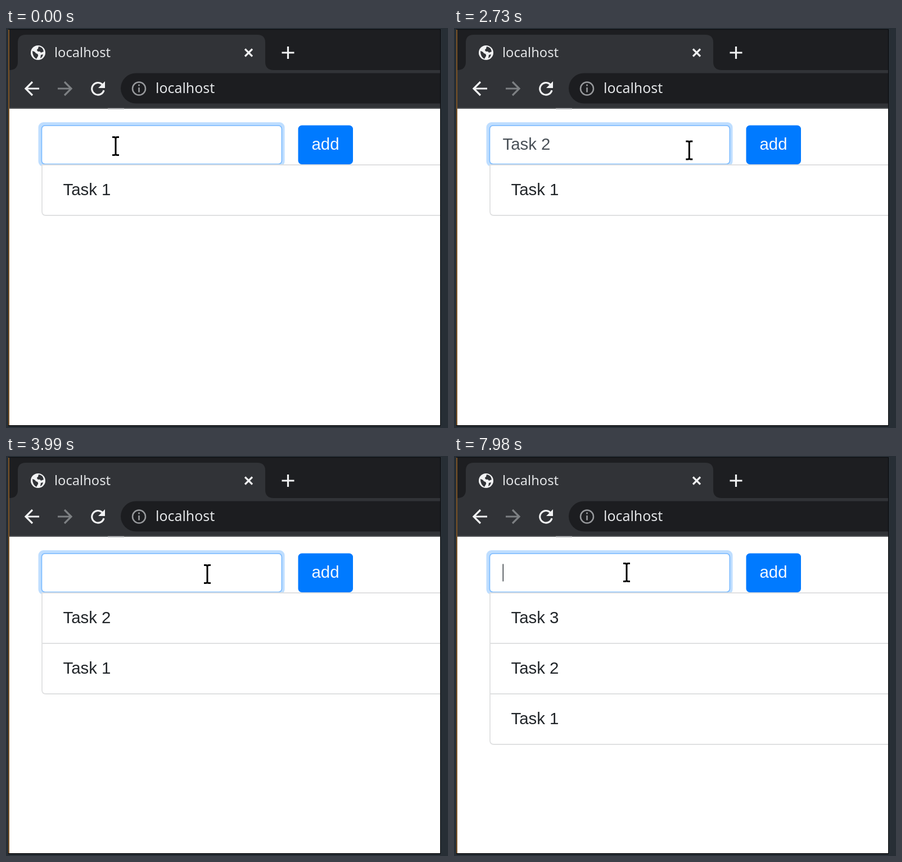
Recreate the animation shown at these times as an HTML page. Size 786 by 713 pixels, loop 8 s.

```html
<!DOCTYPE html>
<html lang="en">
<head>
<meta charset="utf-8">
<title>Task list</title>
<style>
html, body { margin: 0; width: 100%; height: 100%; overflow: hidden; background: #272e35; }
svg { display: block; width: 100%; height: 100%; }
text { font: 29.4px "Liberation Sans", Arial, sans-serif; white-space: pre; }
.ui { font-family: "Noto Sans", "Open Sans", sans-serif; fill: #e2e4e6; }
.icon { fill: none; stroke: #f1f2f3; stroke-width: 3.2; }
.item rect { fill: #fff; }
.item path { fill: none; stroke: #dfe0e1; stroke-width: 1.8; }
.item text { fill: #212529; }
</style>
</head>
<body>
<svg viewBox="0 0 786 713">
  <defs><clipPath id="view"><rect x="6" y="144" width="766" height="564"/></clipPath></defs>

  <!-- browser window -->
  <rect x="4" y="2" width="769" height="707.5" fill="#08090b"/>
  <rect x="6" y="3" width="766" height="73" fill="#1d1e21"/>
  <path d="M6 75Q21 75 21 60V26Q21 12 35 12H447Q461 12 461 26V60Q461 75 476 75H772V143H6Z" fill="#313337"/>
  <path d="M772 80.500H231a27 27 0 0 0 0 54H772Z" fill="#1c1d20"/>
  <rect x="6" y="142" width="766" height="2" fill="#505255"/>
  <rect x="6" y="144" width="766" height="564" fill="#fff"/>
  <rect x="181" y="143" width="29" height="2" fill="#b5b6b8"/>
  <path d="M5 3V708" stroke="#7c5426" stroke-width="2"/>

  <!-- tab and toolbar -->
  <circle cx="57" cy="44" r="13" fill="#f1f2f3"/>
  <path d="M47 41q5 1 6 4q5 1 4 5l-3 5q-7-4-7-14zM58 33q8 1 9 9l-5 2q-1-3-5-2q-4-3 0-5zM62 48l4-1q-1 5-5 7z" fill="#313337"/>
  <text class="ui" x="86" y="52" style="font-size:23.700px">localhost</text>
  <text class="ui" x="266" y="116" style="font-size:24.900px">localhost</text>
  <path class="icon" d="M425 37.500l13 13m0-13l-13 13" stroke-width="3"/>
  <path class="icon" d="M490.500 44h22m-11-11v22"/>
  <path class="icon" d="M59 108H35m12-12l-12 12l12 12"/>
  <path class="icon" d="M92 108h24m-12-12l12 12l-12 12" style="stroke:#7d8083"/>
  <path class="icon" d="M171 100.500A10.800 10.800 0 1 0 174 111"/>
  <path d="M176 95v12h-12z" fill="#f1f2f3"/>
  <circle class="icon" cx="236.500" cy="108" r="11.500" style="stroke:#97999c;stroke-width:2.500"/>
  <path class="icon" d="M236.500 106v8.500m0-14v3" style="stroke:#97999c;stroke-width:2.600"/>

  <!-- page -->
  <g clip-path="url(#view)">
    <rect x="57.500" y="168" width="438" height="79" rx="9" fill="#bfdeff"/>
    <rect x="63.400" y="173.900" width="427" height="68.700" rx="6" fill="#fff" stroke="#80bdff" stroke-width="1.800"/>
    <text id="entry" x="86.500" y="217" fill="#495057"></text>
    <rect id="caret" y="192.500" width="1.600" height="31" fill="#3d4349"/>
    <rect id="button" x="519.500" y="173.500" width="97.500" height="69.500" rx="6.500"/>
    <text x="543.500" y="217" fill="#f4f8ff">add</text>
    <g id="list"></g>
  </g>

  <!-- pointers -->
  <g id="beam" fill="none" stroke-linejoin="round">
    <path id="beamLine" d="M-6-15.500h3.500q2.500 0 2.500 3q0-3 2.500-3h3.500M0-13v26M-6 16.500h3.500q2.500 0 2.500-3q0 3 2.500 3h3.500" stroke="#fff" stroke-width="5.500"/>
    <use href="#beamLine"/>
    <path d="M-6-15.500h3.500q2.500 0 2.500 3q0-3 2.500-3h3.500M0-13v26M-6 16.500h3.500q2.500 0 2.500-3q0 3 2.500 3h3.500" stroke="#050505" stroke-width="3"/>
  </g>
  <path id="hand" d="M-3 1q0-3 3-3t3 3v10q5-2 7 1q4-2 6 1q5-1 5 4v9l-3 4v5H1v-4l-11-11q-2-3 0-5q3-2 7 3z" fill="#050505" stroke="#fff" stroke-width="1.600" stroke-linejoin="round"/>
</svg>
<script>
const $ = id => document.getElementById(id);
const LOOP = 8000, STEP = 70, BLINK = 600;

// [time, entry text, number of tasks]
const edits = [
  [-900, "", 1],
  [840, "T", 1], [980, "Ta", 1], [1120, "Tas", 1], [1260, "Task", 1], [1470, "Task ", 1], [1750, "Task 2", 1],
  [3320, "", 2],
  [4990, "T", 2], [5130, "Ta", 2], [5270, "Tas", 2], [5400, "Task", 2], [5560, "Task ", 2], [5770, "Task 3", 2],
  [6230, "", 3]
];

// [start, end, x, y] of each pointer move
const moves = [
  [0, 1, 195, 210],
  [2380, 2980, 553, 222],
  [3400, 3850, 358, 210],
  [7420, 7840, 307, 207]
];

const clamp = v => Math.max(0, Math.min(1, v));
const ease = v => v * v * (3 - 2 * v);
const mix = (a, b, k) => a + (b - a) * k;

function pointerAt(t) {
  let [, , x, y] = moves[0];
  for (const [start, end, toX, toY] of moves) {
    const k = ease(clamp((t - start) / (end - start)));
    x = mix(x, toX, k);
    y = mix(y, toY, k);
  }
  return [x, y];
}

function listMarkup(count) {
  let out = "";
  for (let i = 0; i < count; i++) {
    const y = 244 + 90 * i;
    const edge = i < count - 1 ? "M64 0V90H790" : "M64 0V83q0 7 7 7H790";
    out += `<g class="item" transform="translate(0 ${y})"><rect x="63" width="723" height="91"/>` +
      `<path d="M64 0H790${edge}"/><text x="101.500" y="54">Task ${count - i}</text></g>`;
  }
  return out;
}

let shown = 0;
function draw(now) {
  const t = Math.floor(now % LOOP / STEP) * STEP;
  const [since, text, count] = edits.findLast(e => e[0] <= t);
  const [x, y] = pointerAt(t);
  const over = x > 519;

  $("entry").textContent = text;
  $("caret").setAttribute("x", 86.5 + (text ? $("entry").getComputedTextLength() - 0.5 : 0));
  $("caret").style.opacity = Math.floor((t - since) / BLINK) % 2 ? 0 : 1;
  $("button").style.fill = over ? "#0067d9" : "#007aff";
  if (count !== shown) {
    $("list").innerHTML = listMarkup(count);
    shown = count;
  }
  for (const [id, on] of [["beam", !over], ["hand", over]]) {
    $(id).style.display = on ? "" : "none";
    $(id).setAttribute("transform", `translate(${x} ${y})`);
  }
  requestAnimationFrame(draw);
}
requestAnimationFrame(draw);
</script>
</body>
</html>
```
